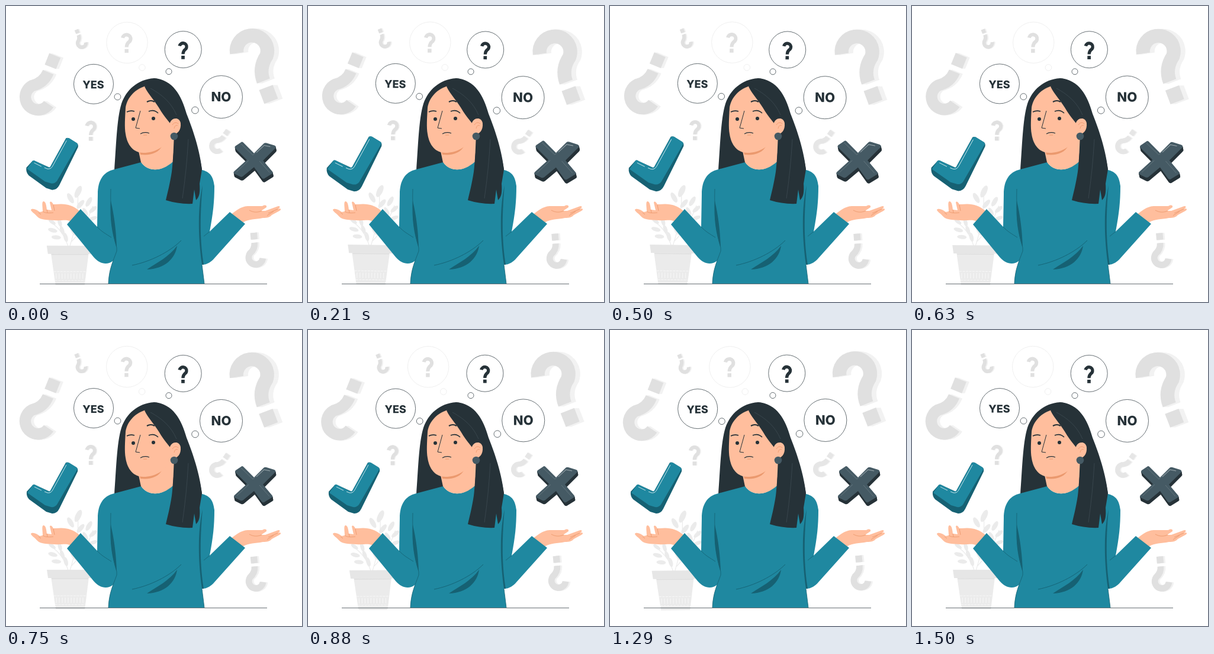
An HTML page with a canvas for the animation above (1540 ms loop, 500x500 px).

```html
<!DOCTYPE html>
<html lang="en">
<head>
<meta charset="utf-8">
<style>
  html, body { margin: 0; width: 100%; height: 100%; overflow: hidden; background: #fff; }
  canvas { display: block; width: 500px; height: 500px; }
</style>
</head>
<body>
<canvas id="stage"></canvas>
<script>
const LOOP = 1540, PHASE = 27;
const TEAL = '#1f88a0', DEEP = '#166173', INK = '#263238', SLATE = '#455a64';
const SKIN = '#ffbe9d', SHADE = '#eb996e', GRAY = '#e0e0e0', PALE = '#ebebeb', FAINT = '#f2f2f2';

const canvas = document.getElementById('stage');
const ctx = canvas.getContext('2d');
const dpr = window.devicePixelRatio || 1;
canvas.width = canvas.height = 500 * dpr;

const rad = deg => deg * Math.PI / 180;

function fill(d, color) {
  ctx.fillStyle = color;
  ctx.fill(new Path2D(d));
}

function line(d, color, width = 1) {
  ctx.strokeStyle = color;
  ctx.lineWidth = width;
  ctx.stroke(new Path2D(d));
}

function ring(x, y, r, color, width = 0.7) {
  ctx.beginPath();
  ctx.arc(x, y, r, 0, 7);
  ctx.fillStyle = '#fff';
  ctx.fill();
  ctx.strokeStyle = color;
  ctx.lineWidth = width;
  ctx.stroke();
}

function dot(x, y, r, color) {
  ctx.beginPath();
  ctx.arc(x, y, r, 0, 7);
  ctx.fillStyle = color;
  ctx.fill();
}

// Runs draw() rotated and scaled around a pivot
function around(x, y, deg, scale, draw) {
  ctx.save();
  ctx.translate(x, y);
  ctx.rotate(rad(deg));
  ctx.scale(scale, scale);
  ctx.translate(-x, -y);
  draw();
  ctx.restore();
}

// Question mark 100 units tall, centred on x, y
function mark(x, y, scale, deg, color) {
  ctx.save();
  ctx.translate(x, y);
  ctx.rotate(rad(deg));
  ctx.scale(scale, scale);
  ctx.beginPath();
  ctx.arc(0, -21, 20, rad(192), rad(400));
  ctx.quadraticCurveTo(0, 3, 0, 21);
  ctx.strokeStyle = ctx.fillStyle = color;
  ctx.lineWidth = 18;
  ctx.stroke();
  ctx.fillRect(-9.5, 30, 19, 19);
  ctx.restore();
}

function solidMark(x, y, scale, deg, depth, color = GRAY) {
  for (let i = 4; i > 0; i--) mark(x + depth * i / 4, y, scale, deg, FAINT);
  mark(x, y, scale, deg, color);
}

function leaf(x, y, length, deg) {
  ctx.beginPath();
  ctx.ellipse(x, y, length / 2, length / 4.6, rad(deg), 0, 7);
  ctx.fillStyle = PALE;
  ctx.fill();
}

function plant() {
  line('M108 406C116 380 124 350 121 312M111 398C128 380 140 358 147 338M105 406C100 390 90 374 76 366', PALE, 1.2);
  [[122, 314, 22, -65], [109, 325, 19, 60], [126, 335, 18, -50], [140, 331, 18, -60],
   [134, 348, 15, 60], [147, 344, 16, -40], [147, 359, 15, -20], [112, 345, 18, 50],
   [78, 365, 14, 35], [91, 366, 15, 75], [79, 379, 16, 15], [95, 379, 15, 70],
   [85, 391, 16, 5], [101, 391, 16, 75], [114, 380, 18, 60], [126, 372, 16, -45]
  ].forEach(l => leaf(...l));
  fill('M76 417H140L133 472H84Z', PALE);
  fill('M69 405H147L146 419H71Z', '#e6e6e6');
  line('M77 420H139', '#dedede', 1.4);
  ctx.setLineDash([4, 1.5]);
  line('M81 449H136M83 464H133', '#f8f8f8', 1);
  ctx.setLineDash([]);
  for (let x = 85; x < 133; x += 5) line(`M${x} 452V461`, '#f8f8f8', 1);
}

function backdrop() {
  solidMark(425, 101, 1.3, -20.9, 8);
  solidMark(62.6, 133, 1.08, 202, 5);
  solidMark(125, 56, 0.35, 158, 2);
  solidMark(143, 211, 0.34, 0, 1.5);
  solidMark(362, 228.5, 0.46, 215, 2, '#e6e6e6');
  solidMark(421, 412, 0.6, 175, 3);
  ring(204.3, 62, 34.7, PALE, 0.8);
  ring(229.7, 104, 5.3, PALE, 0.8);
  mark(203.5, 62.5, 0.34, 0, GRAY);
  plant();
}

function hands() {
  fill('M124 346C112 336 100 333 84 335L80 335C78 331 75 329 74 332L77 345L69 344C68 336 67 330 63 330C60 331 62 340 62 347L57 348C52 344 45 341 42 344C42 347 49 351 52 355C58 362 70 361 82 362C95 363 102 360 109 364Z', SKIN);
  line('M62 347C66 350 73 350 80 349M69 344L70 349M55 349L59 352M80 336L82 346', SHADE, 0.9);
  fill('M380 352C390 345 396 339 408 338L433 338C438 335 441 337 440 340L431 346L438 346L460 338C464 338 463 341 459 343C464 341 466 344 462 346L449 353C446 357 441 358 434 358C420 361 412 359 399 366Z', SKIN);
  line('M411 345C418 349 425 349 432 346M459 343L443 350M452 347L441 354', SHADE, 0.9);
}

function sweater() {
  fill('M228 264L183 276C164 280 155 295 155 318L154 373L126 343L103 369L148 424C158 436 171 438 180 431C186 426 187 419 187 414C181 431 174 444 173 469H335L331 437C340 437 347 432 352 426L404 368L378 348L344 381C350 350 352 330 352 304C350 287 344 280 331 277L280 263C262 281 240 280 228 264Z', TEAL);
  fill('M177 329C175 360 179 385 187 408C186 380 183 355 177 329Z', DEEP);
  fill('M332 303C324 340 324 385 331 437L334 437C328 400 327 360 332 303Z', DEEP);
  fill('M238 445C256 433 275 424 289 405C286 427 268 444 238 445Z', DEEP);
  line('M213 438C243 432 276 416 296 396', DEEP, 0.9);
  line('M177 309C176 340 178 380 187 408L187 414C181 431 174 444 173 469', DEEP, 0.8);
  line('M331 437L335 469', DEEP, 0.8);
  line('M154 373C161 381 169 385 178 391M344 381L334 389', DEEP, 0.8);
}

function head() {
  fill('M222 236L228 264C240 280 262 281 282 263L284 215Z', SKIN);
  fill('M226 247C243 247 256 242 264 236C258 248 244 253 227 251Z', SHADE);
  fill('M236 135C214 142 204 158 202 172C201 190 200 205 202 216C205 236 216 248 232 248C252 248 268 238 278 222L290 200L260 150Z', SKIN);
  fill('M234 136C240 149 254 163 262 178C268 187 273 193 277 198C280 188 293 187 295 198C296 208 293 215 288 222C282 240 282 265 280 280C277 300 273 315 270 328Q292 335 315 334L318 310L321 328C327 322 328 315 327 300L331 276C326 235 312 200 305 182C296 150 282 125 250 122Z', INK);
  fill('M277 198C280 188 293 187 295 198C296 210 290 217 280 217Z', SKIN);
  line('M281 201C284 196 288 196 291 199M284 207C285 202 287 201 290 202', SHADE, 0.9);
  dot(284, 220, 6.3, SLATE);
  line('M244 139C264 150 279 163 288 184M308 225C306 260 303 290 298 325', '#4a5960', 0.5);
  line('M238 162Q245 158 251 162', INK, 2.2);
  line('M204 179Q210 176 217 178M241 178Q250 174 257 181', INK, 1.7);
  dot(215, 191, 3, INK);
  dot(249, 190, 3, INK);
  line('M227 177L219 206L226 207', INK, 1);
  line('M227 216Q234 212 242 215', INK, 1.2);
  line('M232 218H238', SHADE, 1);
}

function woman() {
  hands();
  fill('M250 122C222 124 203 142 195 165C187 190 186 240 183 277L228 266L290 262L331 277C326 240 312 205 305 185C297 155 282 124 250 122Z', INK);
  sweater();
  head();
}

function label(text, x, y, size) {
  ctx.font = `800 ${size}px Inter, sans-serif`;
  ctx.textAlign = 'center';
  ctx.fillStyle = INK;
  ctx.fillText(text, x, y);
}

function thoughts() {
  ring(148, 132, 33.5, INK);
  ring(188.5, 153.5, 5.4, INK);
  label('YES', 147.5, 139.5, 18);
  ring(299.2, 73.5, 31, INK);
  ring(275, 110.7, 5, INK);
  mark(299, 75, 0.3, 0, INK);
  ring(363.5, 153.5, 36, INK);
  ring(319.5, 176, 5.8, INK);
  label('NO', 363.5, 161, 22);
}

function tick() {
  fill('M101 224Q103 223 106 224L119 232Q122 234 121 239L90 302Q86 310 78 310L68 307L39 286Q34 281 35 273L45 262Q47 260 50 262L74 273Z', DEEP);
  fill('M101 225Q103 223 106 224L119 232Q122 234 119 238L86 295Q82 300 76 299L66 296L36 275L45 262Q47 260 50 262L70 272Q74 274 76 270Z', TEAL);
  line('M102 228L79 270Q76 276 70 275L65 273M48 265L60 271', '#d5eaef', 0.9);
}

function cross() {
  const shape = 'M397 231Q399 229 401 231L419 249L435 233Q437 231 440 232L453 236Q457 238 454 241L434 261L450 280Q451 282 449 283L436 291Q434 292 432 290L419 272L401 287Q399 289 396 288L386 283Q384 281 386 279L407 260L388 241Q386 239 388 237Z';
  for (let i = 6; i > 0; i--) {
    ctx.save();
    ctx.translate(i / 5, i);
    fill(shape, INK);
    ctx.restore();
  }
  fill(shape, SLATE);
  line('M397 233L417 252L436 235M428 262L445 281M390 280L410 261', '#6f8087', 0.7);
  line('M423 248L436 236L446 238', '#c3ccd0', 0.7);
}

// Linear sway between 1 and -1 over one loop
function sway(p) {
  if (p < 0.25) return p * 4;
  return p < 0.75 ? 2 - p * 4 : p * 4 - 4;
}

// Two quick pulses in the first half, then rest
function beat(p) {
  if (p >= 0.5) return 1;
  return 1 + 0.1 * (1 - Math.abs(1 - (p % 0.25) * 8));
}

function render(time) {
  const p = ((time + PHASE) % LOOP) / LOOP;
  const angle = sway(p), pulse = beat(p);
  ctx.setTransform(dpr, 0, 0, dpr, 0, 0);
  ctx.fillStyle = '#fff';
  ctx.fillRect(0, 0, 500, 500);
  around(243, 249, angle, 1, backdrop);
  line('M57 469.5H441', INK, 0.7);
  woman();
  around(257, 116, angle, 1, thoughts);
  around(78, 267, 0, pulse, tick);
  around(420.5, 263.3, 0, pulse, cross);
}

const start = performance.now();
function loop() {
  render(performance.now() - start);
  requestAnimationFrame(loop);
}
loop();
</script>
</body>
</html>
```
